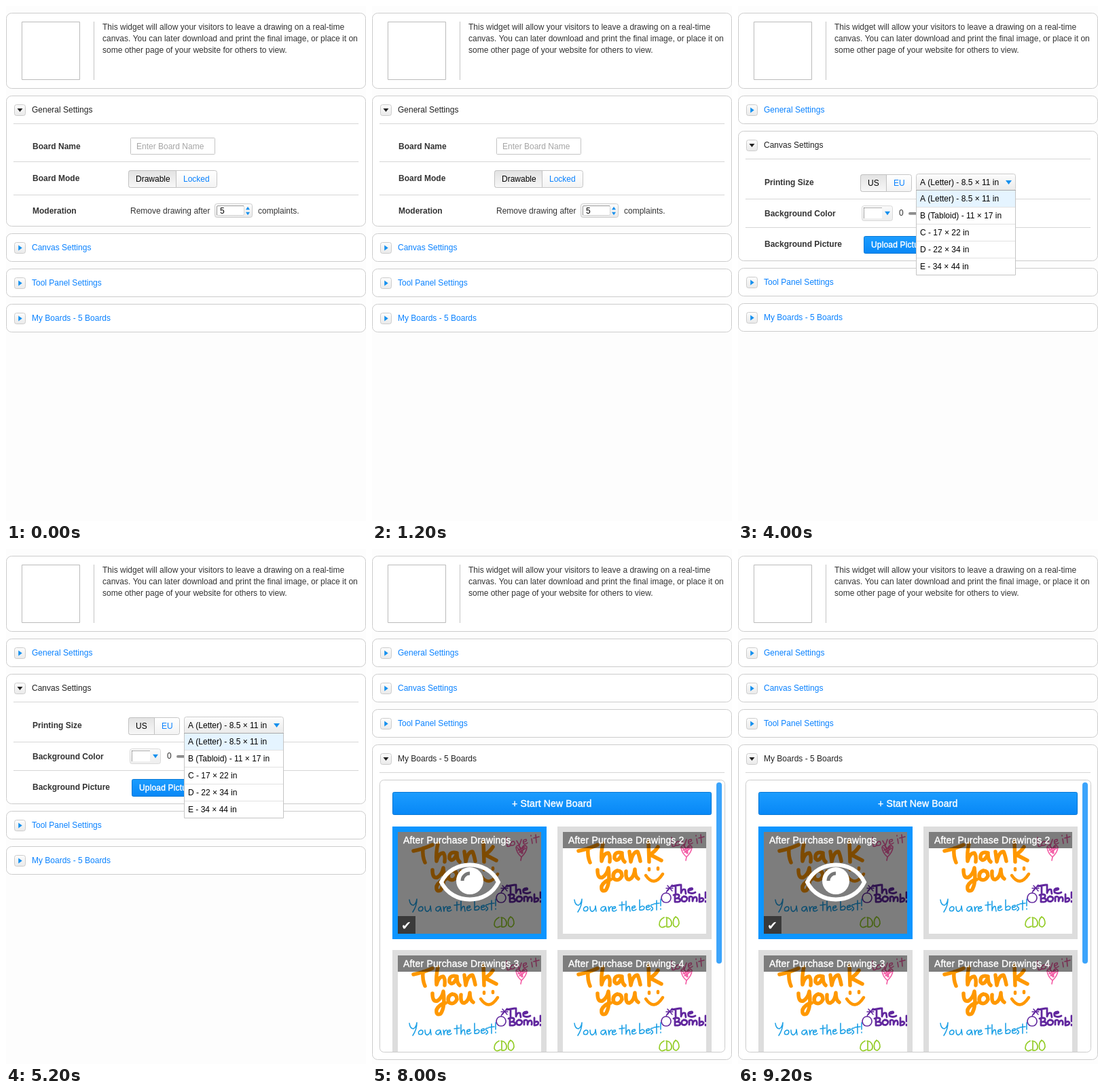
These frames come from a looping animation (530 by 759 pixels, 10000 ms). An HTML page with a canvas:

```html
<!DOCTYPE html>
<html lang="en">
<head>
<meta charset="utf-8">
<title>Drawing board settings</title>
<style>
html, body { margin: 0; width: 100%; height: 100%; overflow: hidden; background: #fdfdfd; }
canvas { display: block; width: 530px; height: 759px; }
</style>
</head>
<body>
<canvas id="stage"></canvas>
<script>
const W = 530, H = 759, STEP = 2000;
const BLUE = '#0a82ff', INK = '#333', LINE = '#ccc';
const FONT = '"Liberation Sans", Arial, sans-serif';
const canvas = document.getElementById('stage');
const ctx = canvas.getContext('2d');
const dpr = window.devicePixelRatio || 1;
canvas.width = W * dpr;
canvas.height = H * dpr;

function text(s, x, y, color = INK, style = '12px') {
  ctx.font = style + ' ' + FONT;
  ctx.fillStyle = color;
  ctx.fillText(s, x, y);
}

const label = (s, y) => text(s, 39, y, INK, 'bold 12px');

// Between regular and bold, used for white captions
function medium(s, x, y, size) {
  ctx.letterSpacing = '0.16px';
  text(s, x, y, '#fff', size + 'px');
  ctx.strokeStyle = '#fff';
  ctx.lineWidth = 0.4;
  ctx.strokeText(s, x, y);
  ctx.letterSpacing = '0px';
}

function fill(x, y, w, h, color) {
  ctx.fillStyle = color;
  ctx.fillRect(x, y, w, h);
}

function shade(y, h, top, bottom) {
  const g = ctx.createLinearGradient(0, y, 0, y + h);
  g.addColorStop(0, top);
  g.addColorStop(1, bottom);
  return g;
}

function box(x, y, w, h, r, color, border = LINE) {
  ctx.beginPath();
  ctx.roundRect(x + 0.5, y + 0.5, w - 1, h - 1, r);
  ctx.fillStyle = color;
  ctx.fill();
  ctx.strokeStyle = border;
  ctx.lineWidth = 1;
  ctx.stroke();
}

const rule = y => fill(11, y, 508, 1, '#d6d6d6');
const button = (x, y, w, h) => box(x, y, w, h, 3, shade(y, h, '#fdfdfd', '#e9e9e9'));
const blueButton = (x, y, w, h) => box(x, y, w, h, 2, shade(y, h, '#1c9dff', '#0787f6'), '#0878d6');

function disc(x, y, r, color) {
  ctx.beginPath();
  ctx.arc(x, y, r, 0, Math.PI * 2);
  ctx.fillStyle = color;
  ctx.fill();
}

// Triangle with half-width w and height h, pointing along dir (0 = right)
function arrow(x, y, w, h, dir, color) {
  ctx.save();
  ctx.translate(x, y);
  ctx.rotate(dir * Math.PI / 2);
  ctx.beginPath();
  ctx.moveTo(-h / 2, -w);
  ctx.lineTo(h / 2, 0);
  ctx.lineTo(-h / 2, w);
  ctx.fillStyle = color;
  ctx.fill();
  ctx.restore();
}

function segments(x, y, w, split, on, off) {
  box(x, y, w, 26, 3, shade(y, 26, '#fff', '#f3f3f3'), '#c6c6c6');
  box(x, y, split - x + 1, 26, [3, 0, 0, 3], shade(y, 26, '#e2e2e2', '#f8f8f8'), '#c2c2c2');
  text(on, x + 11, y + 17, '#000');
  text(off, split + 11, y + 17, BLUE);
}

function picker(y, color) {
  box(182, y, 46, 23, 3, shade(y, 23, '#fafafa', '#ededed'), '#dadada');
  fill(186, y + 4, 26, 15, color);
  fill(185, y + 3, 27, 1, 'rgba(0,0,0,.3)');
  fill(185, y + 3, 1, 16, 'rgba(0,0,0,.3)');
  arrow(220, y + 11.5, 4, 5.5, 1, '#1590ee');
}

function slider(y) {
  text('0', 237, y + 3);
  text('100', 338, y + 3);
  ctx.beginPath();
  ctx.roundRect(251, y - 2, 72, 4, 2);
  ctx.fillStyle = shade(y - 2, 4, '#777', '#aaa');
  ctx.fill();
  ctx.save();
  ctx.shadowColor = 'rgba(0,0,0,.4)';
  ctx.shadowBlur = 3 * dpr;
  ctx.shadowOffsetY = 2 * dpr;
  disc(322, y + 0.5, 8.5, '#8a8a8a');
  ctx.restore();
  disc(322, y + 0.5, 7.5, shade(y - 8, 16, '#fff', '#dedede'));
  disc(322, y + 0.5, 3.2, '#1688dc');
}

function general() {
  label('Board Name', 211);
  box(183, 194, 125, 25, 1, '#fff', '#c4c4c4');
  text('Enter Board Name', 192, 211, '#a5a5a5');
  rule(229);
  label('Board Mode', 258);
  segments(180, 242, 131, 250, 'Drawable', 'Locked');
  rule(278);
  label('Moderation', 306);
  text('Remove drawing after', 183, 306);
  button(307, 291, 56, 21);
  box(310, 294, 41, 15, 2, '#fff', '#d5d5d5');
  fill(311, 294, 39, 1, '#999');
  fill(310, 295, 1, 13, '#999');
  text('5', 315, 306, '#000');
  arrow(356, 298, 3, 4.5, 3, '#1590ee');
  arrow(356, 306, 3, 4.5, 1, '#1590ee');
  text('complaints.', 371, 306);
}

function canvasSettings(open) {
  label('Printing Size', 264);
  segments(180, 248, 76, 218, 'US', 'EU');
  rule(284);
  label('Background Color', 310);
  picker(294, '#fff');
  slider(306);
  rule(326);
  label('Background Picture', 355);
  blueButton(185, 339, 102, 26);
  medium('Upload Picture', 196, 356, 12);
  button(262, 247, 147, 26);
  text('A (Letter) - 8.5 × 11 in', 268, 264, '#000');
  arrow(398.5, 260, 4.5, 6, 1, '#1590ee');
  if (open) menu();
}

function menu() {
  const sizes = ['A (Letter) - 8.5 × 11 in', 'B (Tabloid) - 11 × 17 in',
    'C - 17 × 22 in', 'D - 22 × 34 in', 'E - 34 × 44 in'];
  box(262, 271, 147, 126, 0, '#fff', '#c4c4c4');
  fill(262, 271, 147, 1, '#aaa');
  fill(263, 272, 145, 24, '#e5f4ff');
  sizes.forEach((s, i) => {
    if (i) fill(263, 271 + i * 25, 145, 1, '#e2e2e2');
    text(s, 268, 288 + i * 25, '#000');
  });
}

function toolPanel() {
  label('Fill Color & Opacity', 313);
  picker(297, '#6b6b6b');
  slider(309);
  rule(329);
  label('Icons Color', 355);
  picker(339, '#ccc');
  rule(371);
  label('Secondary Color', 397);
  picker(381, '#ee1c14');
}

// Handwriting inside one board: colour, pen width, strokes
const SKETCH = [
  ['#ff9800', 5.5, 'M31 36Q46 33 59 27M45 32Q44 44 48 53M67 25Q64 38 65 51Q68 39 75 39Q78 42 77 52' +
    'M95 39Q83 36 84 47Q89 54 95 40Q95 49 99 52M106 37L108 52Q111 37 118 37Q120 41 122 51' +
    'M134 22L135 52M148 30Q143 38 136 41Q145 46 153 50'],
  ['#ff9800', 5.5, 'M59 64Q59 77 66 75Q73 71 75 61Q78 84 71 94Q64 97 65 88Q69 80 78 78' +
    'M88 65Q80 68 83 77Q90 82 95 73Q95 65 88 65M101 66Q100 79 106 78Q113 75 114 63Q114 74 119 77'],
  ['#ff9800', 4.5, 'M135 62v2M148 61v2M130 72Q142 90 155 70'],
  ['#1ea1e6', 1.6, 'M25 108q1 8 6 8q4-2 5-9M36 107q0 10-6 19M42 118q-5 2-3 6q5 2 6-3q0-3-3-3' +
    'M48 118q0 8 4 7q4-2 4-8l1 8M70 118q-7 0-6 5q4 5 7-4l1 6M75 118l1 7q0-7 4-7M81 121q6 0 4-3q-6 0-4 6q3 2 6-1'],
  ['#1ea1e6', 1.6, 'M95 111v13M91 116l8-1M101 110v14q2-8 5-6l1 7M110 120q6 0 4-3q-6 0-4 6q3 2 6-1' +
    'M121 108v15q7 1 7-4q-3-4-7 1M131 119q6 0 4-3q-6 0-4 6q3 2 6-1M141 115q-5 0-3 3q5 3 0 6M146 109v14M142 114l8-1M152 107v10M152 121v1'],
  ['#61279e', 2.8, 'M168 88l12-2M174 87v11M182 86v12q2-7 6-5l1 6M193 94q8-1 5-3q-7 0-5 6q5 3 10 0'],
  ['#61279e', 2.8, 'M173 101v10q8 1 8-3q-2-3-6-2q5-1 4-5q-3-2-8 0M186 103q-5 2-2 7q6 2 7-4q-1-3-5-3' +
    'M194 110v-6q4-2 5 1v5q1-7 5-6q2 2 1 6M209 100v11q6 0 6-4q-2-3-6 0M218 97v8M218 110v1'],
  ['#61279e', 1.5, 'M160 98a7 7 0 1 0 .1 0M160 98q1-5 6-7M162 87l7 8M169 86l-7 9M160 91h10'],
  ['#f45ca5', 1.6, 'M168 16l1 13q2 1 5-1M177 22q-5 3-2 6q6 0 5-4q-1-3-3-2M183 21l4 7l3-9' +
    'M193 23q6-1 4-4q-6 0-4 6q3 2 6-1M205 18l1 7M204 13v1M211 12l1 12M208 17l8-2'],
  ['#f45ca5', 1.6, 'M190 33Q184 24 182 31Q183 39 190 45Q198 37 198 30Q194 24 190 33M190 45l-1 5' +
    'M184 31l6 8M187 30l5 9M185 35l10-5M187 38l9-6M193 29l-2 11'],
  ['#93cc26', 1.7, 'M157 134Q150 137 150 145Q152 151 159 147M161 134v14Q169 149 168 141Q166 134 160 134' +
    'M174 133Q169 137 171 146Q176 151 179 143Q179 135 174 133']
].map(([color, width, d]) => ({ color, width, path: new Path2D(d) }));

const LID = new Path2D('M72 82C88 48 140 48 156 82C140 116 88 116 72 82Z');

function eye() {
  ctx.strokeStyle = '#fff';
  ctx.lineWidth = 6;
  ctx.stroke(LID);
  disc(114, 80, 20, '#fff');
  ctx.beginPath();
  ctx.arc(114, 80, 11, Math.PI, Math.PI * 1.5);
  ctx.strokeStyle = '#777';
  ctx.lineWidth = 5;
  ctx.stroke();
}

function card(x, y, title, selected) {
  ctx.save();
  ctx.translate(x, y);
  fill(0, 0, 227, 166, selected ? '#0c95ff' : '#ddd');
  ctx.beginPath();
  ctx.rect(8, 8, 211, 150);
  ctx.clip();
  fill(8, 8, 211, 150, '#fff');
  ctx.lineCap = ctx.lineJoin = 'round';
  for (const s of SKETCH) {
    ctx.strokeStyle = s.color;
    ctx.lineWidth = s.width;
    ctx.stroke(s.path);
  }
  ctx.lineCap = 'butt';
  ctx.lineJoin = 'miter';
  fill(8, 8, 211, selected ? 150 : 24, 'rgba(0,0,0,.51)');
  if (selected) {
    eye();
    fill(8, 132, 26, 26, '#3a3a3a');
    ctx.font = '18px "DejaVu Sans", sans-serif';
    ctx.fillStyle = '#fff';
    ctx.fillText('✔', 13, 152);
  }
  medium(title, 16, 25, 14);
  ctx.restore();
}

function boards() {
  box(11, 340, 509, 402, 6, '#fff');
  ctx.save();
  ctx.beginPath();
  ctx.roundRect(12, 341, 507, 400, 5);
  ctx.clip();
  blueButton(30, 358, 470, 34);
  medium('+ Start New Board', 206, 380, 14);
  for (let i = 0; i < 4; i++) {
    const title = 'After Purchase Drawings' + (i ? ' ' + (i + 1) : '');
    card(30 + i % 2 * 243, 409 + (i >> 1) * 182, title, i === 0);
  }
  ctx.restore();
  ctx.beginPath();
  ctx.roundRect(507, 344, 8, 267, 4);
  ctx.fillStyle = '#3ca4fb';
  ctx.fill();
}

const PANELS = [
  { name: 'General Settings', height: 193, draw: general },
  { name: 'Canvas Settings', height: 192, draw: canvasSettings },
  { name: 'Tool Panel Settings', height: 178, draw: toolPanel },
  { name: 'My Boards - 5 Boards', height: 465, draw: boards }
];

const SCENES = [
  { panel: 0 }, { panel: 1 }, { panel: 1, menu: true }, { panel: 2 }, { panel: 3 }
];

function intro() {
  box(0, 10, W, 112, 8, '#fff');
  box(23, 23, 86, 86, 0, '#fff', '#bbb');
  fill(129, 23, 1, 86, '#c4c4c4');
  ['This widget will allow your visitors to leave a drawing on a real-time',
    'canvas. You can later download and print the final image, or place it on',
    'some other page of your website for others to view.'
  ].forEach((s, i) => text(s, 142, 35 + i * 17));
}

function draw(scene) {
  ctx.setTransform(dpr, 0, 0, dpr, 0, 0);
  fill(0, 0, W, H, '#fdfdfd');
  intro();
  let y = 132;
  PANELS.forEach((p, i) => {
    const open = i === scene.panel;
    const h = open ? p.height : 42;
    box(0, y, W, h, 8, '#fff');
    button(12, y + 13, 17, 17);
    if (open) {
      arrow(20.5, y + 21.5, 4, 5, 1, '#222');
      rule(y + 41);
    } else {
      arrow(21, y + 21.5, 4, 5.5, 0, '#1590ee');
    }
    text(p.name, 38, y + 25, open ? '#222' : BLUE);
    y += h + 10;
  });
  PANELS[scene.panel].draw(scene.menu);
}

let start, shown;
function tick(now) {
  start ??= now;
  const scene = SCENES[Math.floor((now - start) / STEP) % SCENES.length];
  if (scene !== shown) draw(shown = scene);
  requestAnimationFrame(tick);
}
draw(SCENES[0]);
requestAnimationFrame(tick);
</script>
</body>
</html>
```
